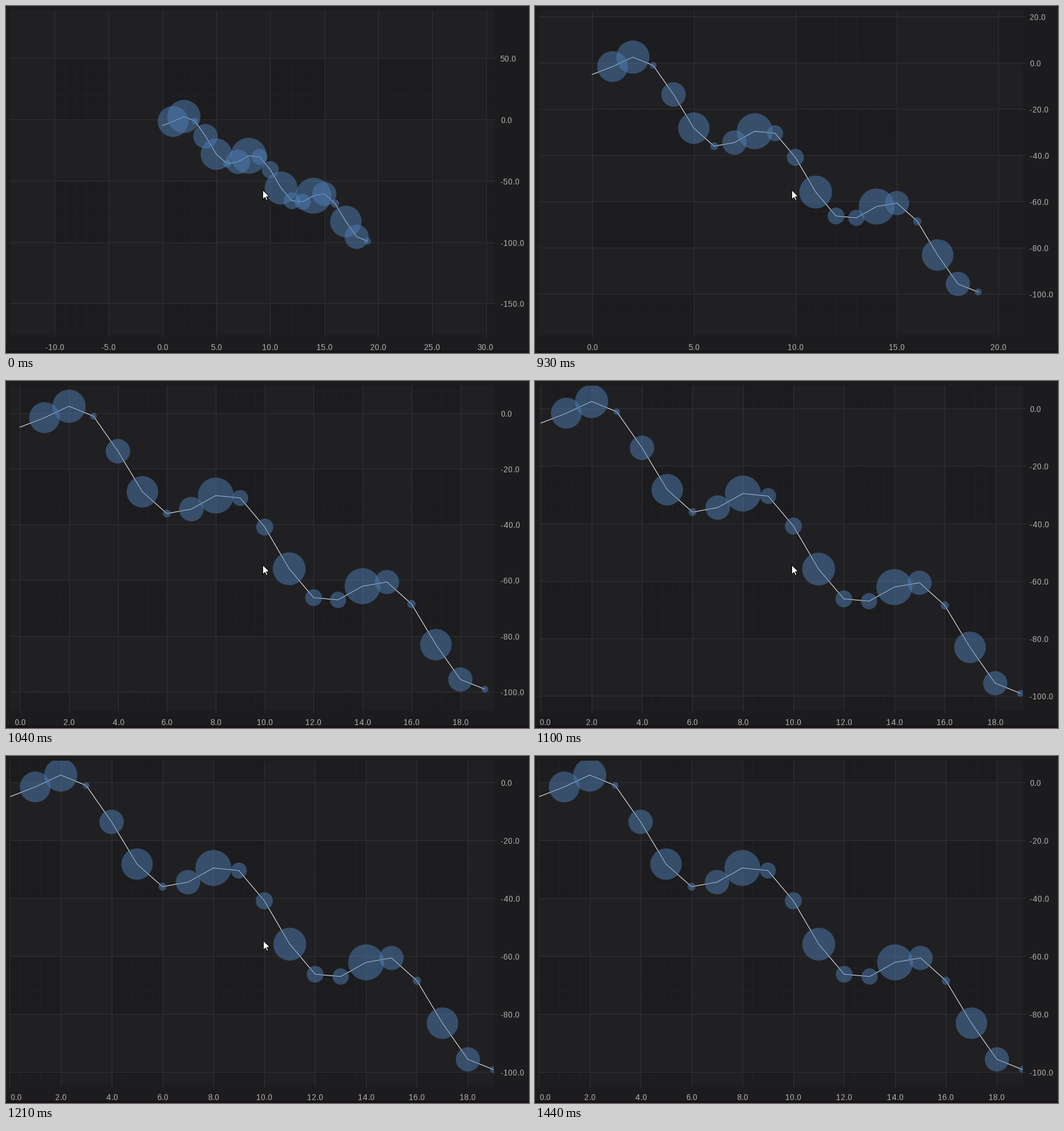
Animation, 895 px wide and 593 px high, one loop 1.94 s. Source, as a matplotlib script:

```python
import math

import matplotlib.pyplot as plt
import numpy as np
from matplotlib.animation import FuncAnimation
from matplotlib.collections import LineCollection, PolyCollection
from matplotlib.patches import Polygon, Rectangle

# Whole-pixel glyph advances, as on a desktop UI
plt.rcParams["text.hinting"] = "force_autohint"
plt.rcParams["text.hinting_factor"] = 1

WIDTH, HEIGHT, DPI = 895, 593, 64
LOOP_MS, TICK_MS = 1940, 10
LEFT, RIGHT, TOP, BOTTOM = 7, 835, 8, 562
PX = 72 / DPI  # points per pixel

BACKGROUND, BAND = "#1c1c1e", "#202022"
MAJOR, MINOR = "#323234", "#212123"
TEXT, BUBBLE = "#acacac", "#4e7eb4"

# Screen refreshes during the zoom, and linear zoom progress at each of them
STEP_TIMES = [870, 930, 990, 1040, 1100, 1160, 1210, 1270, 1330, 1390, 1440]
PROGRESS = [0, .1727, .429, .568, .69, .8134, .94, 1]

# Visible ranges (low, high) before and after the zoom
X_WIDE, X_FIT = np.array([-14.13, 30.66]), np.array([0.0, 19.0])
Y_WIDE, Y_FIT = np.array([-175.1, 88.75]), np.array([-104.25, 7.47])

index = np.arange(20)
values = np.cumsum(10 * np.sin(index) - 5)
diameters = 0.985 * np.abs(60 * np.sin(index) + 3)

CURSOR = np.array([(0.5, 0.5), (0.5, 16.5), (4.2, 13), (6.8, 18.5),
                   (9, 17.6), (6.6, 12), (11.5, 11.5)])
CURSOR_START, CURSOR_END = np.array([439, 314]), np.array([765, 580])

fig = plt.figure(figsize=(WIDTH / DPI, HEIGHT / DPI), dpi=DPI,
                 facecolor=BACKGROUND)
ax = fig.add_axes([0, 0, 1, 1])
ax.set(xlim=(0, WIDTH), ylim=(HEIGHT, 0))
ax.axis("off")

ax.add_patch(Rectangle((0, 589), WIDTH, 4, fc="#1a1317", lw=0, aa=False))
plot_area = Rectangle((LEFT, TOP), RIGHT - LEFT, BOTTOM - TOP,
                      transform=ax.transData)


def add_lines(color, z):
    lines = LineCollection([], colors=color, linewidths=PX,
                           antialiaseds=False, capstyle="butt", zorder=z)
    lines.set_snap(False)
    return ax.add_collection(lines, autolim=False)


def add_labels(align):
    return [ax.text(0, 0, "", color=TEXT, family="Liberation Sans",
                    size=14 * PX, ha=align, va="baseline")
            for _ in range(14)]


minor_lines = add_lines(MINOR, 1)
bands = ax.add_collection(
    PolyCollection([], facecolors=BAND, linewidths=0, antialiaseds=False,
                   zorder=2), autolim=False)
major_lines = add_lines(MAJOR, 3)
curve, = ax.plot([], [], color="white", lw=PX, zorder=4)
bubbles = ax.scatter(index, values, s=(diameters * PX) ** 2, color=BUBBLE,
                     alpha=0.5, linewidths=0, zorder=5)
for artist in (minor_lines, bands, curve, bubbles):
    artist.set_clip_path(plot_area)
x_labels, y_labels = add_labels("center"), add_labels("left")
cursor = ax.add_patch(Polygon(CURSOR, fc="white", ec="black", lw=PX,
                              joinstyle="miter", zorder=9))


def nice_step(span):
    return next(s for s in (1, 2, 5, 10, 20, 50, 100) if s >= span / 10)


def ticks(low, high, step):
    first, last = math.ceil(low / step), math.floor(high / step)
    return [k * step for k in range(first, last + 1)]


def to_x(value, low, high):
    return 6.5 + (value - low) / (high - low) * 827.5


def to_y(value, low, high):
    return 8 + (high - value) / (high - low) * 553


def crisp(position):
    return round(position) + 0.5


def vertical(x, end):
    return [(x, TOP), (x, end)]


def horizontal(y, end):
    return [(LEFT, y), (end, y)]


def box(x0, y0, x1, y1):
    return [(x0, y0), (x1, y0), (x1, y1), (x0, y1)]


def odd_cells(low, high, step):
    """Intervals between major ticks whose index is odd."""
    first, last = math.floor(low / step), math.floor(high / step)
    return [(k * step, (k + 1) * step)
            for k in range(first, last + 1) if k % 2]


def label_width(text):
    return 8 * sum(c.isdigit() for c in text) + 4 + 5 * (text[0] == "-")


def fill_labels(labels, entries):
    for label in labels:
        label.set_text("")
    for label, (text, x, y) in zip(labels, entries):
        label.set_text(text)
        label.set_position((x, y))


def draw_grid(xr, yr):
    x_step, y_step = nice_step(xr[1] - xr[0]), nice_step(yr[1] - yr[0])
    x_major, y_major = ticks(*xr, x_step), ticks(*yr, y_step)
    minor_lines.set_segments(
        [vertical(crisp(to_x(v, *xr)), BOTTOM) for v in ticks(*xr, x_step / 5)]
        + [horizontal(crisp(to_y(v, *yr)), RIGHT)
           for v in ticks(*yr, y_step / 5)])
    major_lines.set_segments(
        [vertical(crisp(to_x(v, *xr)), 567) for v in x_major]
        + [horizontal(crisp(to_y(v, *yr)), 840) for v in y_major])
    bands.set_verts(
        [box(round(to_x(a, *xr)), TOP, round(to_x(b, *xr)), BOTTOM)
         for a, b in odd_cells(*xr, x_step)]
        + [box(LEFT, round(to_y(b, *yr)), RIGHT, round(to_y(a, *yr)))
           for a, b in odd_cells(*yr, y_step)])

    x_entries = []
    for v in x_major:
        text = f"{v:.1f}"
        half = label_width(text) / 2
        center = min(max(crisp(to_x(v, *xr)), LEFT + half), RIGHT - half)
        x_entries.append((text, center, 588))
    fill_labels(x_labels, x_entries)
    fill_labels(y_labels, [(f"{v:.1f}", 846, round(to_y(v, *yr)) + 6)
                           for v in y_major])


def draw_cursor(step):
    """Rest during the zoom, then speed up towards the lower edge."""
    cursor.set_visible(step < len(STEP_TIMES))
    travel = max(0, (step - 6) / 4) ** 4
    tip = CURSOR_START + travel * (CURSOR_END - CURSOR_START)
    cursor.set_xy(CURSOR + np.round(tip))


def update(frame):
    step = sum(frame * TICK_MS >= t for t in STEP_TIMES)
    # Cubic ease-out
    remaining = (1 - PROGRESS[min(step, len(PROGRESS) - 1)]) ** 3
    xr = X_FIT + (X_WIDE - X_FIT) * remaining
    yr = Y_FIT + (Y_WIDE - Y_FIT) * remaining
    draw_grid(xr, yr)
    xs, ys = to_x(index, *xr), to_y(values, *yr)
    curve.set_data(xs, ys)
    bubbles.set_offsets(np.column_stack([xs, ys]))
    draw_cursor(step)
    return []


animation = FuncAnimation(fig, update, frames=LOOP_MS // TICK_MS,
                          interval=TICK_MS, repeat=True, repeat_delay=0)
plt.show()
```
